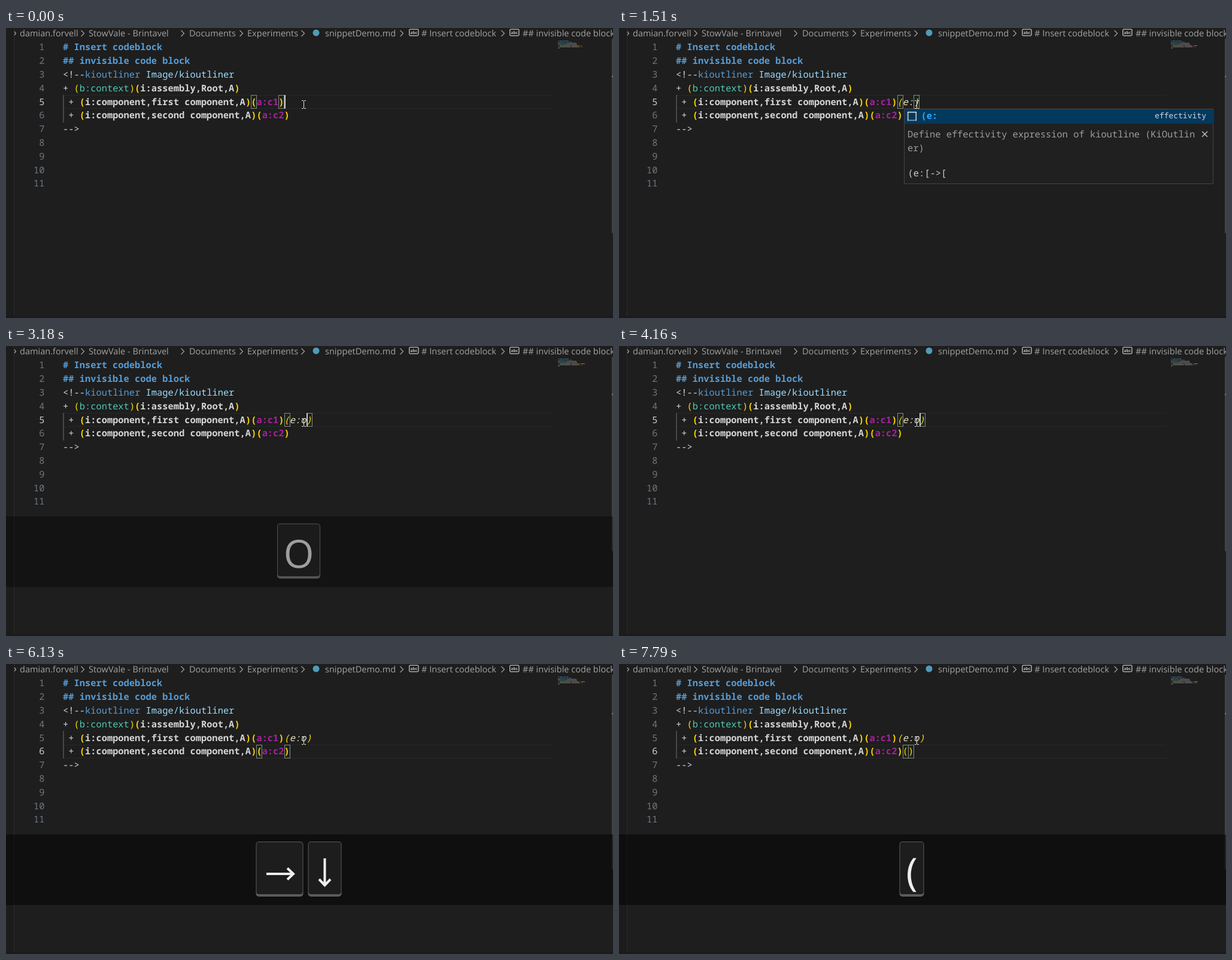
Recreate the animation shown at these times as an HTML page. Size 1014 by 485 pixels, loop 8 s.

```html
<!DOCTYPE html>
<html lang="en">
<head>
<meta charset="utf-8">
<title>Editor typing demo</title>
<style>
  html, body { margin: 0; width: 100%; height: 100%; overflow: hidden; background: #1e1e1e; }
  svg { display: block; width: 1014px; height: 485px; }
  text { white-space: pre; text-rendering: geometricPrecision; font: 15.4px "Noto Sans Mono", monospace; }
  text.ui { font: 14.55px "Open Sans", "Noto Sans", sans-serif; }
  text.abc { font: bold 6.5px "Open Sans", sans-serif; }
  text.key { font: 65px "Open Sans", "Noto Sans", sans-serif; }
  text.small { font-size: 13.05px; }
  text.bold { font-weight: bold; }
  text.italic { font-style: italic; }
</style>
</head>
<body>
<svg id="stage" viewBox="0 0 1014 485"></svg>
<script>
const LOOP = 8000, LEFT = 95, PITCH = 9.24, ROW = 22.8;
const GOLD = '#ffd700', PLAIN = '#d4d4d4', BLUE = '#569cd6', CRUMB = '#a3a3a3';

// Each step changes part of the editor state from its time on.
const steps = [
  [0, { first: '', second: '', row: 5, col: 40, box: [34, 39], caret: 1, keys: '', menu: 0, veil: 0, ink: 0 }],
  [120, { first: '()', col: 41, keys: '(', veil: .25, ink: .45 }],
  [250, { box: [40, 41], veil: .5, ink: 1 }],
  [400, { first: '(e)', col: 42, box: [40, 42], keys: '(E', menu: 1 }],
  [810, { first: '(e:)', col: 43, box: [40, 43], keys: '(E:' }],
  [1230, { caret: 0 }],
  [1510, { keys: '' }],
  [1770, { caret: 1 }],
  [2200, { caret: 0 }],
  [2750, { caret: 1 }],
  [3180, { first: '(e:o)', col: 44, box: [40, 44], menu: 0, keys: 'O', veil: .36, ink: .62 }],
  [3310, { veil: .5, ink: 1 }],
  [3600, { caret: 0 }],
  [3880, { keys: '' }],
  [4160, { caret: 1 }],
  [4590, { caret: 0 }],
  [5150, { caret: 1, col: 45, keys: '→', veil: .08, ink: .35 }],
  [5280, { veil: .16, ink: .7 }],
  [5430, { veil: .23, ink: 1 }],
  [5570, { row: 6, col: 41, box: [35, 40], keys: '→↓', veil: .36 }],
  [5700, { veil: .5 }],
  [6130, { caret: 0 }],
  [6410, { keys: '' }],
  [6540, { caret: 1 }],
  [7070, { caret: 0 }],
  [7200, { second: '()', col: 42, caret: 1, keys: '(', veil: .15, ink: .2 }],
  [7340, { box: [41, 42], veil: .33, ink: .65 }],
  [7500, { veil: .5, ink: 1 }],
  [7790, { caret: 0 }],
];

const esc = s => String(s).replace(/&/g, '&amp;').replace(/</g, '&lt;');
const text = (x, y, s, fill, cls = '', more = '') =>
  `<text x="${x}" y="${y}" fill="${fill}" class="${cls}" ${more}>${esc(s)}</text>`;
const rect = (x, y, w, h, fill, more = '') =>
  `<rect x="${x}" y="${y}" width="${w}" height="${h}" fill="${fill}" ${more}/>`;
const path = (d, stroke, width = 1) =>
  `<path d="${d}" fill="none" stroke="${stroke}" stroke-width="${width}"/>`;
const colX = col => LEFT + col * PITCH;
const rowY = row => 112 + (row - 5) * ROW;

// A token is [text, colour, style]; a group is wrapped in gold brackets.
const group = (body, color, style) => [['(', GOLD, style], [body, color, style], [')', GOLD, style]];

function typedGroup(s) {
  if (!s) return [];
  const set = s.includes(':');
  return group(s.slice(1, -1), set ? '#e4e2c0' : PLAIN, set ? 'italic' : '');
}

const part = (name, ref, typed) => [
  [' + ', PLAIN],
  ...group(`i:component,${name} component,A`, PLAIN, 'bold'),
  ...group('a:' + ref, '#a6219c', 'bold'),
  ...typedGroup(typed),
];

const codeLines = s => [
  [['# Insert codeblock', BLUE, 'bold']],
  [['## invisible code block', BLUE, 'bold']],
  [['<!--', PLAIN], ['kioutliner', BLUE], [' Image/kioutliner', '#9cdcfe']],
  [['+ ', PLAIN], ...group('b:context', '#4ec9b0'), ...group('i:assembly,Root,A', PLAIN, 'bold')],
  part('first', 'c1', s.first),
  part('second', 'c2', s.second),
  [['-->', PLAIN]],
];

function code(s) {
  let out = '';
  codeLines(s).forEach((tokens, i) => {
    let col = 0;
    for (const [str, color, style] of tokens) {
      out += text(colX(col), rowY(i + 1) + 16.5, str, color, style);
      // The minimap repeats every word as a thin dash.
      for (const run of str.matchAll(/\S+/g))
        out += rect(922 + col + run.index, 21 + i * 2, run[0].length, 1, color, 'opacity=".5"');
      col += str.length;
    }
  });
  for (let n = 1; n <= 11; n++)
    out += text(64.5, rowY(n) + 16.5, n, n === s.row ? '#cccccc' : '#6e7681', '', 'text-anchor="end"');
  return out;
}

function breadcrumbs() {
  const labels = [[23, 'damian.forvell'], [138, 'StowVale - Brintavel'], [306, 'Documents'], [403, 'Experiments'],
    [533, 'snippetDemo.md'], [694, '# Insert codeblock'], [863, '## invisible code block']];
  const abc = x => rect(x + .7, 2.2, 15.2, 10.6, 'none', 'rx="1.5" stroke="#c5c5c5" stroke-width="1.3"') +
    text(x + 8.3, 9.8, 'abc', '#c5c5c5', 'abc', 'text-anchor="middle"');
  return labels.map(([x, s]) => text(x, 14, s, CRUMB, 'ui')).join('') +
    [128, 295, 393, 496, 661, 830].map(x => path(`M${x - 2.5} 4l5 5l-5 5`, CRUMB, 1.2)).join('') +
    path('M14 6l2.5 3l-2.5 3', CRUMB, 1.2) +
    '<circle cx="518" cy="8" r="5.5" fill="#519aba"/>' + abc(673) + abc(841);
}

function frame(s) {
  const y = rowY(s.row);
  return rect(0, 0, 1014, 485, '#1e1e1e') + rect(0, 0, 13, 485, '#1c1c1c') +
    rect(13, 0, 1, 485, '#2b2b2b') + rect(0, 482, 1014, 3, '#1a1a1a') +
    rect(1012, 18, 2, 325, '#434343') + rect(1012, s.row === 5 ? 80 : 82, 2, 2, '#808080') +
    rect(96, Math.round(y), 818, 1, '#282828') + rect(96, Math.round(y + 22), 818, 1, '#282828') +
    rect(95.5, 112, 1, 46, '#707070') +
    s.box.map(c => rect(Math.round(colX(c)) + .5, Math.round(y) + .5, 9, 22,
      'rgba(0,100,0,.1)', 'stroke="#888"')).join('');
}

function menu() {
  const grey = '#9d9d9d';
  return rect(476.5, 135.5, 516, 125, '#202020', 'stroke="#454545"') +
    rect(477, 136, 517, 24, '#04395e') +
    path('M482.7 155v-14.3h13.6V155', '#e4e4e4', 1.4) +
    [482, 485.2, 488.4, 491.6, 494.8].map(x => rect(x, 153.6, 2, 1.6, '#e4e4e4')).join('') +
    text(504.5, 152, '(e:', '#2aaaff', 'bold') +
    text(981, 151, 'effectivity', '#cfd6dc', 'small', 'text-anchor="end"') +
    text(482, 183, 'Define effectivity expression of kioutline (KiOutlin', grey) +
    text(482, 206, 'er)', grey) + text(482.5, 248, '(e:[->[', '#cccccc') +
    path('M974 173l9 9m0 -9l-9 9', '#cccccc', 1.3);
}

const keyWidth = { '(': 41, E: 55, ':': 35.5, O: 72, '→': 79, '↓': 56 };

function keyFace(k, mid) {
  if (k === '→') return path(`M${mid - 22} 351h45m-10 -9.5l10 9.5l-10 9.5`, '#eee', 4);
  if (k === '↓') return path(`M${mid} 325v45m-9.5 -10l9.5 10l9.5 -10`, '#eee', 4);
  return text(mid, 371, k, '#eee', 'key', 'text-anchor="middle"');
}

function keyPanel(s) {
  if (!s.keys) return '';
  const keys = [...s.keys];
  const total = keys.reduce((sum, k) => sum + keyWidth[k], 8 * (keys.length - 1));
  let x = 489 - total / 2, out = rect(0, 285, 1014, 118, '#000', `opacity="${s.veil}"`);
  for (const k of keys) {
    const w = keyWidth[k];
    out += `<g opacity="${Math.min(1, s.ink * 1.4)}">` +
      rect(x, 297, w, 92, '#5c5c5c', 'rx="5"') + rect(x + 1, 298, w - 2, 87, '#1d1d1d', 'rx="4"') + '</g>' +
      `<g opacity="${s.ink}">${keyFace(k, x + w / 2)}</g>`;
    x += w + 8;
  }
  return out;
}

function picture(s) {
  return frame(s) + breadcrumbs() + code(s) +
    (s.caret ? rect(Math.round(colX(s.col)), rowY(s.row), 2, ROW, '#c8c8c8') : '') +
    (s.menu ? menu() : '') + keyPanel(s) +
    path('M494 121.5h2.5l1 1l1 -1h2.5M497.5 122v12M494 134.5h2.5l1 -1l1 1h2.5', '#e8e8e8');
}

const stage = document.getElementById('stage');
let shown = 0;
function tick() {
  const t = performance.now() % LOOP;
  const past = steps.filter(([at]) => at <= t);
  if (past.length !== shown) {
    shown = past.length;
    stage.innerHTML = picture(Object.assign({}, ...past.map(([, change]) => change)));
  }
  requestAnimationFrame(tick);
}
tick();
</script>
</body>
</html>
```
